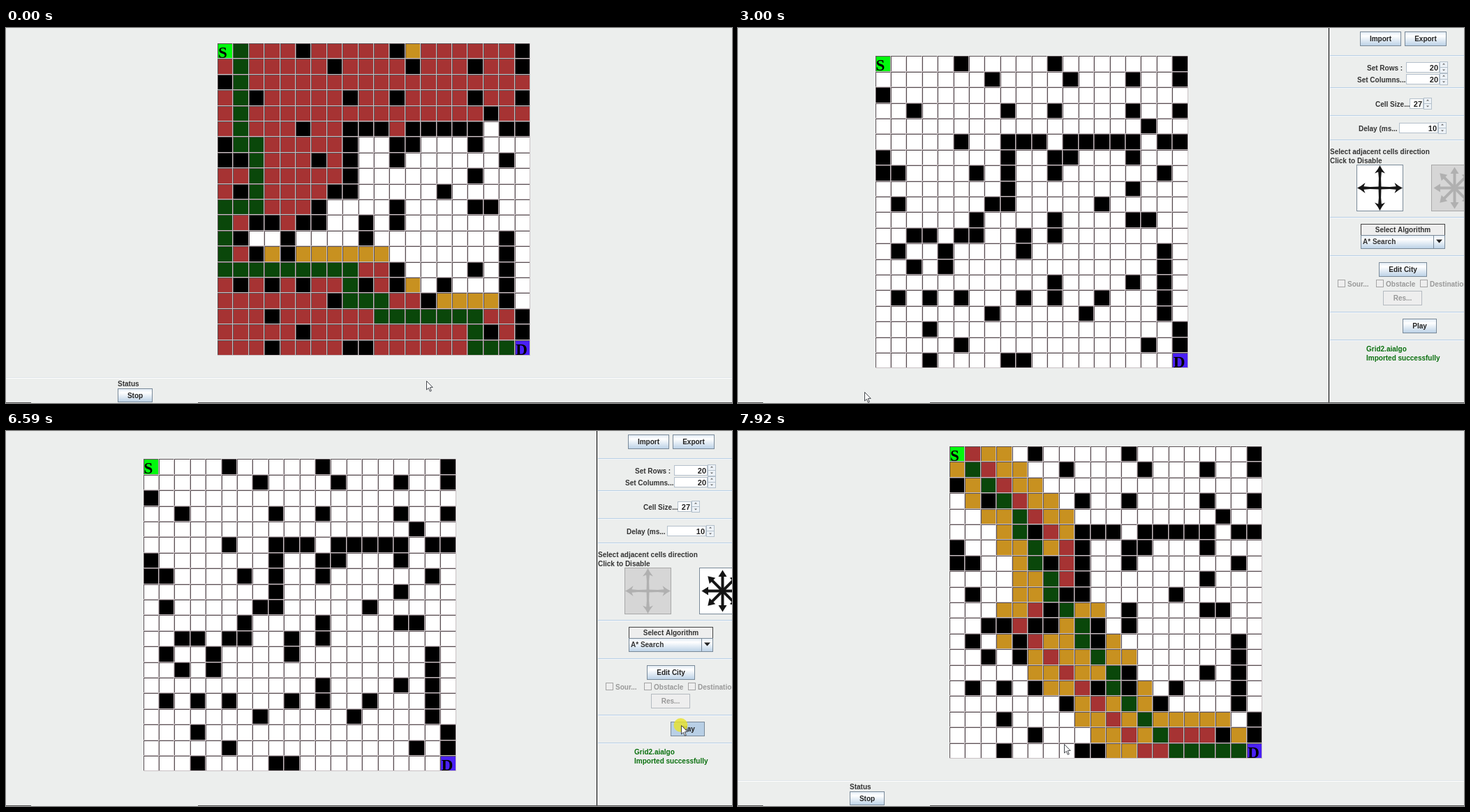
An HTML page with a canvas that plays this animation: 1040 px wide and 538 px high, repeating every 8000 ms.

```html
<!DOCTYPE html>
<html lang="en">
<head>
<meta charset="utf-8">
<title>Grid path search</title>
<style>
html, body { margin: 0; width: 100%; height: 100%; overflow: hidden; background: #eceeed; }
canvas { display: block; }
</style>
</head>
<body>
<canvas id="stage" width="1040" height="538"></canvas>
<script>
const ctx = document.getElementById('stage').getContext('2d');
const LOOP = 8000, TICK = 67, N = 20, PITCH = 22.4;
const PANEL_ON = 3000, PANEL_OFF = 6780;
const BG = '#eceeed', EDGE = '#7a8a99', PRESSED = '#b8cfe5', INK = '#333333';
const RED = '#a63333', ORANGE = '#c89120', GREEN = '#0a470a', WHITE = '#ffffff', BLACK = '#000000';

// The city map: blocked columns, row by row
const walls = ('5 11 19|7 12 16 19|0|2 8 11 16 19|17|5 8 9 10 12 13 14 15 16 18 19|0 8 11 12 16|' +
  '0 1 6 8 11 18|8 16|1 7 8 14|6 11 16 17|2 3 5 6 9 11|1 4 9 18|2 4 18|11 16 18|' +
  '1 3 5 9 11 14 18|7 13 18|3 19|5 17 19|3 8 9').split('|').map(row => new Set(row.split(' ').map(Number)));
const id = (r, c) => r * N + c;
const isFree = (r, c) => r >= 0 && c >= 0 && r < N && c < N && !walls[r].has(c);

function neighbours(r, c, diagonal) {
  const found = [];
  for (let dr = -1; dr <= 1; dr++)
    for (let dc = -1; dc <= 1; dc++)
      if ((dr || dc) && (diagonal || !dr || !dc) && isFree(r + dr, c + dc)) found.push([r + dr, c + dc]);
  return found;
}

// Cells along a polyline of [row, column] corners
function trace(corners) {
  const cells = [corners[0]];
  for (const [r1, c1] of corners.slice(1)) {
    let [r, c] = cells[cells.length - 1];
    while (r !== r1 || c !== c1) {
      r += Math.sign(r1 - r);
      c += Math.sign(c1 - c);
      cells.push([r, c]);
    }
  }
  return cells;
}
const idSet = cells => new Set(cells.map(([r, c]) => id(r, c)));

// Four-way A*: visits each cell whose steps + distance left fit the shortest route
function fourWaySearch() {
  const steps = new Map([[0, 0]]), queue = [[0, 0]];
  for (const [r, c] of queue)
    for (const [nr, nc] of neighbours(r, c, false))
      if (!steps.has(id(nr, nc))) {
        steps.set(id(nr, nc), steps.get(id(r, c)) + 1);
        queue.push([nr, nc]);
      }
  const shortest = steps.get(N * N - 1);
  return idSet(queue.filter(([r, c]) => steps.get(id(r, c)) + 2 * (N - 1) - r - c <= shortest));
}
const fourClosed = fourWaySearch();
const fourPath = idSet(trace([[0, 1], [6, 1], [6, 2], [10, 2], [10, 0], [14, 0], [14, 8],
  [16, 8], [16, 10], [17, 10], [17, 16], [19, 16], [19, 18]]));

// Eight-way search: the route and its side branches, swept downwards
const eightRoute = trace([[1, 1], [4, 4], [5, 4], [6, 5], [7, 5], [8, 6], [9, 6], [11, 8],
  [12, 8], [14, 10], [15, 10], [19, 14], [19, 18]]);
const eightPath = idSet(eightRoute);
const rank = ([r, c]) => r + (r < 16 ? -c : c) / 40;
const visits = [
  ...eightRoute,
  ...trace([[0, 1], [6, 7], [8, 7]]),
  ...trace([[10, 5], [11, 4], [19, 12], [19, 13]]),
  ...trace([[18, 14], [18, 16]])
].sort((a, b) => rank(a) - rank(b));

function searchColour(closed, path, diagonal) {
  return (r, c) => {
    if (path && path.has(id(r, c))) return GREEN;
    if (closed.has(id(r, c))) return RED;
    return neighbours(r, c, diagonal).some(([a, b]) => closed.has(id(a, b))) ? ORANGE : WHITE;
  };
}

function box(x, y, w, h, fill, line) {
  ctx.fillStyle = fill;
  ctx.fillRect(x, y, w, h);
  if (line) {
    ctx.strokeStyle = line;
    ctx.lineWidth = 1;
    ctx.strokeRect(x + .5, y + .5, w - 1, h - 1);
  }
}

function text(str, x, y, colour = INK, align = 'left', size = 10) {
  ctx.font = `bold ${size}px "Liberation Sans", Arial, sans-serif`;
  ctx.textAlign = align;
  ctx.fillStyle = colour;
  ctx.fillText(str, x, y);
}

function poly(points, fill) {
  ctx.beginPath();
  points.forEach(([x, y]) => ctx.lineTo(x, y));
  ctx.closePath();
  ctx.fillStyle = fill;
  ctx.fill();
}

function drawGrid(ox, oy, colourOf) {
  const px = c => Math.round(ox + c * PITCH), py = r => Math.round(oy + r * PITCH);
  for (let r = 0; r < N; r++)
    for (let c = 0; c < N; c++) {
      const x = px(c), y = py(r), w = px(c + 1) - x, h = py(r + 1) - y;
      let fill = isFree(r, c) ? colourOf(r, c) : BLACK;
      if (r + c === 0) fill = '#00f90c';
      if (r + c === 2 * N - 2) fill = '#4a20f5';
      box(x, y, w, h, '#c9c1c4');
      box(x, y, w - 1, h - 1, '#5c5256');
      box(x + 1, y + 1, w - 2, h - 2, fill);
    }
  ctx.font = 'bold 23px "Liberation Serif", "Times New Roman", serif';
  ctx.textAlign = 'left';
  ctx.fillStyle = BLACK;
  ctx.fillText('S', ox + 1, oy + 20.5);
  ctx.fillText('D', ox + 19 * PITCH + 1.6, oy + 19 * PITCH + 21);
}

function shade(x, y, w, h) {
  const g = ctx.createLinearGradient(0, y, 0, y + h);
  g.addColorStop(0, '#dde8f3');
  g.addColorStop(.3, WHITE);
  g.addColorStop(1, '#b8cfe5');
  box(x, y, w, h, g, EDGE);
}

function button(label, x, y, w, h, mouse, down) {
  const over = mouse.x >= x && mouse.x < x + w && mouse.y >= y && mouse.y < y + h;
  if (down) box(x, y, w, h, PRESSED, EDGE);
  else shade(x, y, w, h);
  if (over && !down) {
    ctx.strokeStyle = '#8faecb';
    ctx.strokeRect(x + 1.5, y + 1.5, w - 3, h - 3);
  }
  text(label, x + w / 2, y + h / 2 + 3.8, '#222222', 'center');
}

function spinner(label, labelX, value, x, y, w) {
  const right = x + w, mid = y + 7;
  box(x, y, w, 15, WHITE, '#b4c0cb');
  text(value, right - 2, y + 12, '#222222', 'right', 11);
  for (const dir of [-1, 1]) {
    box(right, dir < 0 ? y - 1 : mid, 12, 9, '#edf2f7', '#b4c0cb');
    const base = mid + dir * 3.5;
    poly([[right + 4, base], [right + 8, base], [right + 6, base + dir * 2]], '#666666');
  }
  text(label, labelX, y + 11.8);
}

function arrows(x, count, back, ink, edge) {
  box(x, 196, 67, 67, back, edge);
  ctx.save();
  ctx.translate(x + 33.5, 229.5);
  for (let i = 0; i < count; i++) {
    if (count === 4) {
      poly([[-2, 0], [-1.6, -14], [-2.6, -26], [2.6, -26], [1.6, -14], [2, 0]], ink);
      poly([[0, -32.5], [3, -27], [7.5, -21], [0, -24], [-7.5, -21], [-3, -27]], ink);
    } else {
      poly([[-2, 0], [-2, -22], [2, -22], [2, 0]], ink);
      poly([[0, -30], [6, -20.5], [-6, -20.5]], ink);
    }
    ctx.rotate(Math.PI * 2 / count);
  }
  ctx.restore();
}

function drawRun(t, mouse) {
  let colour = searchColour(fourClosed, fourPath, false);
  if (t >= PANEL_OFF) {
    const step = Math.floor((t - PANEL_OFF) / TICK);
    const closed = idSet([[0, 0], ...visits.slice(0, Math.round(step * 4.17))]);
    colour = searchColour(closed, step >= 11.5 && eightPath, true);
  }
  drawGrid(303, 22, colour);
  box(0, 501, 1040, 1, '#dfe4e8');
  box(0, 502, 1040, 1, WHITE);
  text('Status', 160, 514);
  button('Stop', 160, 517, 50, 20, mouse, t >= 2730 && t < PANEL_ON);
}

function drawPanel(t, mouse) {
  drawGrid(196.6, 40.4, () => WHITE);
  box(846, 0, 1, 538, BLACK);
  for (const y of [39, 85, 125, 160, 271, 326, 407, 447]) {
    box(848, y, 192, 1, '#b8cfe5');
    box(848, y + 1, 192, 1, '#f4f7fa');
  }
  button('Import', 891, 5, 59, 21, mouse);
  button('Export', 955, 5, 60, 21, mouse);
  spinner('Set Rows :', 901, '20', 957, 49, 48);
  spinner('Set Columns...', 887, '20', 957, 66, 48);
  spinner('Cell Size...', 913, '27', 962, 101, 20);
  spinner('Delay (ms...', 889, '10', 947, 136, 56);
  text('Select adjacent cells direction', 848, 180.6);
  text('Click to Disable', 848, 193.6);

  const eight = t >= 4770, off = ['#d6d6d6', '#b0b0b0', '#a8a8a8'];
  const on = [WHITE, '#151515', EDGE];
  arrows(886, 4, ...(eight ? off : on));
  arrows(993, 8, ...(eight ? on : off));

  box(892, 281, 121, 17, '#eeeeee', '#444444');
  text('Select Algorithm', 952.5, 293, INK, 'center');
  shade(892, 297, 121, 20);
  if (eight && t < 6590) box(894, 299, 102, 16, '#a3b8cc');
  text('A* Search', 895, 309.8);
  shade(996, 297, 17, 20);
  poly([[1000, 303.5], [1009, 303.5], [1004.5, 308.5]], '#222222');

  button('Edit City', 918, 336, 69, 21, mouse);
  for (const [label, x] of [['Sour...', 859], ['Obstacle', 914], ['Destination', 977]]) {
    box(x, 361, 11, 11, '#eeeeee', '#a4a4a4');
    text(label, x + 14, 370.8, '#999999');
  }
  box(924, 377, 56, 21, '#eeeeee', '#b4bac0');
  text('Res...', 952, 391.3, '#999999', 'center');
  button('Play', 952, 417, 49, 21, mouse, t >= 6590);
  text('Grid2.aialgo', 900, 463.5, '#0b700f');
  text('Imported successfully', 900, 476.5, '#0b700f');
}

// Pointer stops: leave, arrive, x, y
const stops = [
  [70, 130, 551, 474], [260, 920, 183, 515], [1120, 1330, 173, 516], [2060, 2530, 181, 522],
  [3150, 3890, 1022, 230], [3960, 4300, 930, 232], [4770, 5020, 942, 340],
  [5090, 5850, 967, 422], [7840, 7920, 467, 449]
];

function pointer(t) {
  let x = 602, y = 506;
  for (const [leave, arrive, tx, ty] of stops) {
    if (t < leave) break;
    const ticks = Math.floor((t - leave) / TICK) + 1;
    const done = t >= arrive ? 1 : ticks * TICK / (arrive - leave + TICK);
    const p = done * done * (3 - 2 * done);
    x += (tx - x) * p;
    y += (ty - y) * p;
  }
  return { x, y };
}

function drawPointer({ x, y }, t) {
  const clicked = [[2730, PANEL_ON], [4500, 4770], [6590, PANEL_OFF]].some(([a, b]) => t >= a && t < b);
  if (clicked) {
    ctx.beginPath();
    ctx.arc(x - .5, y, 10, 0, Math.PI * 2);
    ctx.fillStyle = 'rgba(232,226,40,.8)';
    ctx.fill();
  }
  ctx.save();
  ctx.translate(x + .5, y + .5);
  poly([[0, 0], [0, 12.5], [2.9, 9.9], [4.9, 14.8], [6.8, 14], [4.8, 9.2], [8.7, 9]], WHITE);
  ctx.strokeStyle = '#30343a';
  ctx.lineWidth = .9;
  ctx.stroke();
  ctx.restore();
}

function frame(now) {
  const t = now % LOOP;
  const mouse = pointer(t);
  box(0, 0, 1040, 538, BG);
  if (t < PANEL_ON || t >= PANEL_OFF) drawRun(t, mouse);
  else drawPanel(t, mouse);
  box(0, 537, 36, 1, '#555555');
  box(275, 537, 765, 1, '#555555');
  drawPointer(mouse, t);
}

const began = performance.now();
function tick() {
  frame(performance.now() - began);
  requestAnimationFrame(tick);
}
tick();
</script>
</body>
</html>
```
